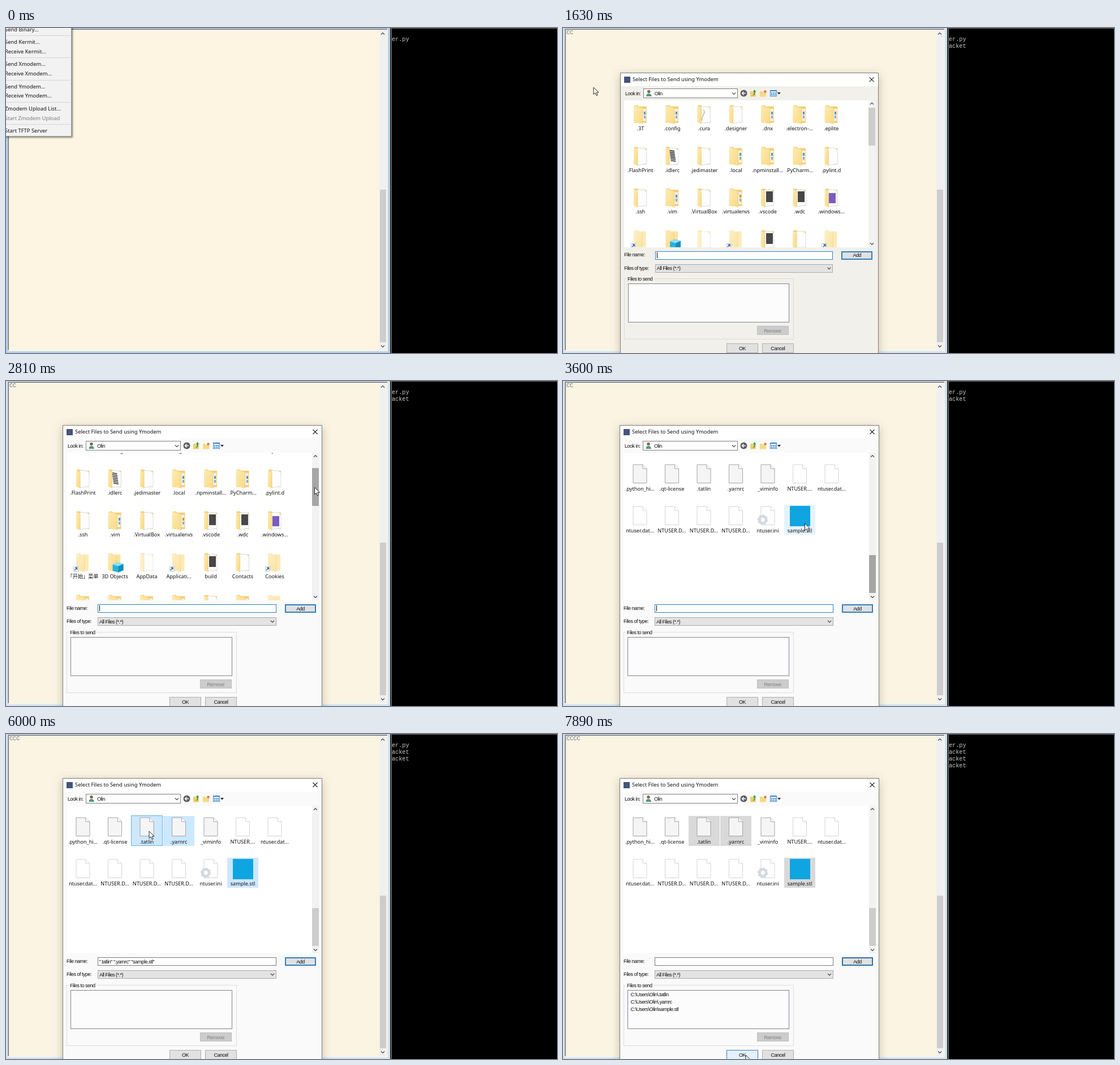
Recreate the animation shown at these times as an HTML page. Size 974 by 575 pixels, loop 8 s.

```html
<!DOCTYPE html>
<html lang="en">
<head>
<meta charset="utf-8">
<title>Send files</title>
<style>
  html, body { margin: 0; width: 100%; height: 100%; overflow: hidden; background: #000; }
  svg { display: block; width: 100vw; height: 100vh; }
  text { white-space: pre; }
  rect { shape-rendering: crispEdges; }
  .ui { font: 9.4px "Noto Sans", "Open Sans", sans-serif; fill: #111; }
  .label { font: 9.15px "Noto Sans", "Noto Sans CJK SC", sans-serif; fill: #111; text-anchor: middle; }
  .form { font: 9px "Liberation Sans", Arial, sans-serif; letter-spacing: -.5px; fill: #111; }
  .mid { text-anchor: middle; }
  .mono { font: 10.2px "Liberation Mono", "Noto Sans Mono", monospace; }
  .tip { font: 9px "Noto Sans CJK SC", "Noto Sans CJK", sans-serif; fill: #575757; }
</style>
</head>
<body>
<svg id="stage" viewBox="0 0 974 575" preserveAspectRatio="none"></svg>
<script>
const LOOP = 8000, SCROLL = 652.5;
const USER = 'Olin';

// ---- drawing helpers ----
const box = (x1, y1, x2, y2, fill, line = 'none', more = '') => {
  const o = line === 'none' ? 0 : .5;
  return `<rect x="${x1 + o}" y="${y1 + o}" width="${x2 - x1 - 2 * o}" height="${y2 - y1 - 2 * o}" fill="${fill}" stroke="${line}" ${more}/>`;
};
const text = (cls, x, y, str, more = '') =>
  `<text class="${cls}" x="${x}" y="${y + 3.3}" ${more}>${str}</text>`;
const path = (d, fill, line = 'none', more = '') =>
  `<path d="${d}" fill="${fill}" stroke="${line}" ${more}/>`;
const chevron = (x, y, dir = 1) =>
  path(`M${x - 3} ${y - 1.5 * dir}l3 ${3 * dir}l3 ${-3 * dir}`, 'none', '#444', 'stroke-width="1.2"');
const button = (id, x1, y1, x2, y2, str) =>
  box(x1, y1, x2, y2, '#e1e1e1', '#adadad', `id="${id}"`) +
  text('form mid', (x1 + x2) / 2, (y1 + y2) / 2, str);

// ---- file icons, centred on 0,0 ----
const back = path('M-11-16h6l2 2h14v29h-22z', '#f1cd6e');
const front = w => path(`M-12-16L${w}-11V17L-12 14z`, 'url(#manila)') +
  path(`M${w}-11V17`, 'none', '#ecca70', 'stroke-width=".8"');
const page = path('M-6-14h13l4 4v24l-17 2z', '#fdfdfd', '#d4d4d4', 'stroke-width=".8"');
const thin = front(-5);
const plain = path('M-11-16h6l2 2h13v29h-21z', '#fbe3a0') + front(3);
const stuffed = top => back + path('M2-10h8v22h-8z', '#f4f1e6') +
  box(6, -5, 9, 0, top) + box(6, 2, 9, 7, '#7fb0d6') + front(4);
const link = box(-17, 7, -8, 16, '#fff', '#c4c4c4') +
  path('M-15 14l4.5-4.5M-14 9.5h3.5v3.5', 'none', '#1f5fae', 'stroke-width="1.4"');
const file = (line, fill) =>
  path('M-12-17.5h17l7 7v25.500h-24z', fill, line, 'stroke-width=".9"') +
  path('M5-17.5v7h7', '#fff', line, 'stroke-width=".9"');
const cog = `<circle cx="-9" cy="6" r="6" fill="none" stroke="#d3d9de" stroke-width="4.500"/>
  <circle cx="-9" cy="6" r="8.300" fill="none" stroke="#d3d9de" stroke-width="2" stroke-dasharray="3.200 3.300"/>`;
const sheetLines = [-10, -7, -4, -1, 2, 5, 8].map((y, i) => `M${-5 + i * .4} ${y}l9 1.500`).join('');
const icons = {
  b: stuffed('#5a93c4'),
  o: stuffed('#d98a4e'),
  p: back + page + thin,
  s: back + page + path('M-1-8l2 4l-3 6l-2 9', 'none', '#a9a9a9', 'stroke-width="1.200"') + thin,
  n: back + page + path(sheetLines, 'none', '#484848', 'stroke-width="1.900"') + thin,
  j: back + page + box(-3, -11, 9, 8, '#474747') + thin,
  v: back + page + box(-4, -8, 8, 10, '#7a5cc0') + thin,
  l: `<g opacity=".75">${plain}</g>` + link,
  c: plain + path('M-4 4l9-4l10 3v11l-9 4l-10-3z', '#27b2dc') + path('M-4 4l9-4l10 3l-9 4z', '#8fe0f4') + path('M6 7l9-4v11l-9 4z', '#1290bd'),
  h: `<g opacity=".55">${back + page + thin}</g>`,
  f: file('#9a9a9a', '#f5f5f5'),
  w: file('#cfcfcf', '#fff'),
  g: file('#cfcfcf', '#fff') + cog,
  q: box(-17.5, -18.5, 18.5, 17.5, '#0fa5e1')
};
const rows = [
  ['bbspbbb', '.3T .config .cura .designer .dnx .electron-... .eplite'],
  ['pnpbbbp', '.FlashPrint .idlerc .jedimaster .local .npminstall... .PyCharm... .pylint.d'],
  ['pbpojjv', '.ssh .vim .VirtualBox .virtualenvs .vscode .wdc .windows...'],
  ['lchljpl', '「开始」菜单 3D_Objects AppData Applicati... build Contacts Cookies'],
  ['bbbbpbl', 'Desktop Documents Downloads Favorites lib Links Local_Set...'],
  ['blllppb', 'Music My_Docum... NetHood PrintHood scripts Searches Pictures'],
  ['plbbblb', 'Saved_Ga... SendTo source tests Videos Templates tools'],
  ['bbpppbb', 'notes output samples scratch temp work www'],
  ['fffffff', '.bash_hi... .condarc .gitconfig .lesshst .npmrc .node_re... .profile'],
  ['fffffww', '.python_hi... .qt-license .tatlin .yarnrc _viminfo NTUSER.... ntuser.dat...'],
  ['wwwwgq', 'ntuser.dat... NTUSER.D... NTUSER.D... NTUSER.D... ntuser.ini sample.stl']
];
const TATLIN = 65, YARNRC = 66, SAMPLE = 75;
const colX = c => 136 + 56.5 * c, rowY = r => 152 + 74 * r;
const files = rows.map(([kinds, names], r) => names.split(' ').map((name, c) =>
  `<g transform="translate(${colX(c)} ${rowY(r)})">` +
  `<rect class="cell" data-i="${r * 7 + c}" x="-27.500" y="-21" width="55" height="53" fill="none"/>` +
  icons[kinds[c]] + text('label', 0, 25, name.replace(/_([A-Z])/, ' $1')) + '</g>').join('')).join('');

// ---- pieces of the scene ----
const menuItems = [[3, 'Send Binary...'], [25, 'Send Kermit...'], [42, 'Receive Kermit...'], [64, 'Send Xmodem...'],
  [81, 'Receive Xmodem...'], [104, 'Send Ymodem...'], [120, 'Receive Ymodem...'], [143, 'Zmodem Upload List...'],
  [160, 'Start Zmodem Upload'], [182, 'Start TFTP Server']];

const windows = box(0, 0, 679, 575, '#b7d0ea', 'none', 'id="frame"') +
  box(3, 1, 675, 572, '#f2f4f4') + box(3, 1, 674, 570, '#a5abb0') + box(4, 2, 674, 570, '#6d7276') +
  box(5, 3, 675, 570, '#fdf5e2', 'none', 'id="paper"') +
  box(660, 3, 672, 570, '#f0f0f0') + box(661, 286, 672, 556, '#cdcdcd') +
  box(672, 3, 675, 570, '#f6f3ea') + chevron(666, 10, -1) + chevron(666, 563) +
  box(679, 0, 681, 575, '#2b2b2b') + box(681, 0, 682, 575, '#8a8a8a') +
  box(682, 0, 974, 575, '#000') + box(682, 0, 974, 1, '#6e6e6e') +
  text('mono', 6, 8, '', 'id="ping" fill="#657b83"') +
  text('mono', 682, 20, 'er.py', 'fill="#c8c8c8"') +
  [32, 44, 56].map((y, i) => text('mono', 682, y, 'acket', `id="line${i}" fill="#c8c8c8"`)).join('');

const menu = '<g id="menu" filter="url(#soft)">' + box(-6, -6, 116, 192, '#f2f2f2', '#9b9b9b') +
  box(-2, 0, 113, 17, '#91c9f7', 'none', 'id="hot"') +
  [14, 53, 93, 132, 171].map(y => box(0, y - 1, 114, y, '#d5d5d5')).join('') +
  menuItems.map(([y, s], i) => text('ui', -2, y, s, i === 8 ? 'style="fill:#7b7b7b"' : '')).join('') + '</g>';

const toolbar = text('form', 109, 114.5, 'Look in:') + box(141, 106, 309, 123, '#fff', '#7f7f7f') +
  '<circle cx="151" cy="111.500" r="2.800" fill="#7d6a58"/>' + path('M146.500 120q0-5 4.500-5t5 5z', '#4f9a76') +
  text('form', 161, 114.5, USER) + chevron(302, 115) +
  '<circle cx="319.500" cy="114.500" r="6" fill="#5d5d5d"/>' +
  path('M323 114.500h-6.500m3-3l-3 3l3 3', 'none', '#fff', 'stroke-width="1.500"') +
  path('M331 111h4l1 1.500h5v8h-10z', '#f2cf6b') + path('M334 119q4-1 3.500-7h-2l3-4l3 4h-2q1 7-5.500 7z', '#3f9e46') +
  path('M348 111h4l1 1.500h6v8h-11z', '#f7d983') + '<circle cx="357.500" cy="111.500" r="2.200" fill="#e2743c"/>' +
  box(366, 109, 378, 120, '#fff', '#2f7fc8') + box(366, 109, 378, 111, '#2f7fc8') +
  [368, 371, 374].map(x => box(x, 113, x + 2, 115, '#2f7fc8') + box(x, 116, x + 2, 118, '#2f7fc8')).join('') +
  path('M379 113h6l-3 3.500z', '#222');

const form = text('form', 107, 401.5, 'File name:') + box(162, 395, 478, 410, '#fff', '#2f7fc0', 'id="field"') +
  text('form', 164.5, 402.5, '', 'id="name"') + box(165, 397, 166, 407, '#000', 'none', 'id="caret"') +
  button('add', 493.5, 395.5, 547.5, 409.5, 'Add') +
  text('form', 107, 425, 'Files of type:') + box(162, 418, 478, 433, '#e3e3e3', '#a9a9a9') +
  text('form', 165, 425.5, 'All Files (*.*)') + chevron(471, 425.5) +
  box(107, 444, 408, 552, 'none', '#dcdcdc') + box(111, 440, 160, 448, '#fafafa', 'none', 'class="body"') +
  text('form', 113, 444.5, 'Files to send') + box(114, 453, 400, 522, '#fcfcfc', '#7f858c') +
  '<g id="queue">' + ['.tatlin', '.yarnrc', 'sample.stl'].map((f, i) =>
    text('form', 119.5, 461 + 13 * i, `C:\\Users\\${USER}\\${f}`)).join('') + '</g>' +
  box(343, 528, 399, 544, '#cccccc', '#bfbfbf') + text('form mid', 370.5, 536.5, 'Remove', 'style="fill:#838383"') +
  button('ok', 289, 559, 345, 576, 'OK') + button('cancel', 352, 559, 408, 576, 'Cancel');

const dialog = '<g id="dialog">' +
  `<g filter="url(#glow)">${box(100, 78, 559, 600, '#fff', '#7d7d7d')}</g>` +
  box(101, 102, 558, 599, '#fafafa', 'none', 'class="body"') +
  box(107, 85, 118, 96, '#45557a') + text('ui', 122, 90, 'Select Files to Send using Ymodem') +
  path('M542.500 86l8 8m0-8l-8 8', 'none', '#222', 'stroke-width="1.100"') + toolbar +
  box(107, 127, 541, 388, '#fff') + `<g clip-path="url(#view)"><g id="files">${files}</g></g>` +
  box(541, 127, 553, 388, '#f2f2f2') + box(541, 140, 553, 207, '#cdcdcd', 'none', 'id="thumb"') +
  chevron(547, 133, -1) + chevron(547, 382) + form + '</g>';

const tip = '<g id="tip">' + box(296, 190, 414, 232, '#fff', '#9a9a9a') +
  ['类型: YARNRC 文件', '大小: 121 字节', '修改日期: 2020/6/30 9:52'].map((s, i) =>
    text('tip', 300, 198 + 12.7 * i, s)).join('') + '</g>';

const $ = id => document.getElementById(id);
$('stage').innerHTML = `<defs>
  <linearGradient id="manila" x2="1" y2="1"><stop stop-color="#fdebb4"/><stop offset="1" stop-color="#f9da85"/></linearGradient>
  <filter id="soft" x="-20%" y="-20%" width="140%" height="140%"><feDropShadow dx="2" dy="2" stdDeviation="1.500" flood-opacity=".45"/></filter>
  <filter id="glow" x="-20%" y="-20%" width="140%" height="140%"><feDropShadow dx="0" dy="4" stdDeviation="8" flood-color="#6b6148" flood-opacity=".38"/></filter>
  <clipPath id="view"><rect x="107" y="127" width="434" height="261"/></clipPath></defs>` +
  windows + menu + dialog + tip +
  path('M0 0V12.500L3 9.700L5 14.500L7.200 13.600L5.200 9H9Z', '#fff', '#111', 'id="cursor" stroke-width=".9"');

// ---- timeline ----
const bursts = [[150, 960, 7], [1360, 2290, 8], [2410, 2410, 1], [2690, 3600, 7], [3750, 4650, 8],
  [4800, 5730, 8], [5850, 6810, 8], [6930, 7890, 7]];
const ticks = [0, ...bursts.flatMap(([a, b, n]) =>
  Array.from({ length: n }, (_, i) => a + (b - a) * i / Math.max(1, n - 1)))];

const moves = [[150, 30, 20], [690, 56, 117], [960, 54, 105], [1640, 54, 105], [2290, 546, 168], [2410, 545.5, 174.5],
  [2560, 545.5, 174.5], [3300, 545.5, 342.5], [3600, 427.5, 252], [3900, 427.5, 252], [4650, 299.5, 174], [5220, 299.5, 174],
  [5600, 253, 172], [6130, 253, 172], [6680, 520, 404], [7070, 520, 404], [7760, 323, 568]];
const ease = p => p * p * (3 - 2 * p);
const ramp = (t, a, b) => Math.min(1, Math.max(0, (t - a) / (b - a)));
function pointer(t) {
  let i = 0;
  while (i < moves.length - 2 && t > moves[i + 1][0]) i++;
  const [a, x, y] = moves[i], [b, u, v] = moves[i + 1], p = ease(ramp(t, a, b));
  return [x + (u - x) * p, y + (v - y) * p];
}

const cells = [...document.querySelectorAll('.cell')];
const bodies = [...document.querySelectorAll('.body')];
const set = (el, attrs) => { for (const k in attrs) el.setAttribute(k, attrs[k]); };
const show = (id, on) => set($(id), { opacity: on ? 1 : 0 });

function render(now) {
  const t = ticks.filter(k => k <= now).pop();
  const [x, y] = pointer(t);
  const open = t >= 1360, added = t >= 6930;
  set($('cursor'), { transform: `translate(${x} ${y})` });
  show('cursor', t >= 150);

  show('menu', !open);
  const hot = menuItems.find(([m]) => Math.abs(m - y) <= 8.5);
  show('hot', t >= 150 && hot);
  if (hot) set($('hot'), { y: hot[0] - 8 });

  set($('frame'), { fill: open ? '#d4e3f0' : '#b7d0ea' });
  set($('paper'), { fill: open ? '#fbf4e2' : '#fdf5e2' });
  const pings = t >= 7350 ? 4 : t >= 4350 ? 3 : open ? 2 : 0;
  $('ping').textContent = 'C'.repeat(pings);
  [2, 3, 4].forEach((n, i) => show('line' + i, pings >= n));

  const size = t < 1600 ? .95 : t < 1740 ? .9956 : 1;
  set($('dialog'), {
    transform: `translate(329.500 330) scale(${size}) translate(-329.500 -330)`,
    opacity: t < 1450 ? 0 : t < 1600 ? .5 : 1
  });
  bodies.forEach(b => set(b, { fill: t < 1740 ? '#f2f0eb' : '#fafafa' }));

  const drag = ease(ramp(t, 2560, 3300)), scroll = SCROLL * drag;
  set($('files'), { transform: `translate(0 ${-scroll})` });
  set($('thumb'), { y: 140 + 168 * drag, fill: t >= 2290 && t < 3740 ? '#a6a6a6' : '#cdcdcd' });

  const picked = [[3750, SAMPLE], [5300, YARNRC], [5850, TATLIN]].filter(([a]) => t >= a).map(p => p[1]);
  const focus = added ? -1 : picked[picked.length - 1];
  cells.forEach(c => {
    const i = +c.dataset.i, cy = rowY(Math.floor(i / 7)) - scroll;
    const over = t >= 1740 && y > 127 && y < 388 && Math.abs(x - colX(i % 7)) < 28 && y > cy - 21 && y < cy + 32;
    const sel = picked.includes(i);
    set(c, {
      fill: sel ? (added ? '#d9d9d9' : '#cce8ff') : over ? '#e5f3ff' : 'none',
      stroke: i === focus ? '#6aaedb' : 'none'
    });
  });

  const names = ['', 'sample.stl', '".yarnrc" "sample.stl"', '".tatlin" ".yarnrc" "sample.stl"'];
  $('name').textContent = added ? '' : names[picked.length];
  set($('field'), { stroke: picked.length ? '#7a7a7a' : '#2f7fc0' });
  show('caret', !picked.length && Math.floor((t - 1350) / 530) % 2 === 0);
  show('queue', added);

  const onAdd = x > 493 && x < 548 && y > 395 && y < 411;
  const onOk = x > 289 && x < 345 && y > 559;
  set($('add'), { fill: onAdd ? '#e5f1fb' : '#e1e1e1', stroke: added ? '#2e6fa8' : '#2f7fc0', 'stroke-width': 2 });
  set($('ok'), { fill: onOk ? '#e5f1fb' : '#e1e1e1', stroke: onOk ? '#2f7fc0' : '#adadad' });
  set($('tip'), { opacity: t < 4900 || t >= 5300 ? 0 : t < 5000 ? .45 : 1 });
}

function loop() {
  render(performance.now() % LOOP);
  requestAnimationFrame(loop);
}
loop();
</script>
</body>
</html>
```
